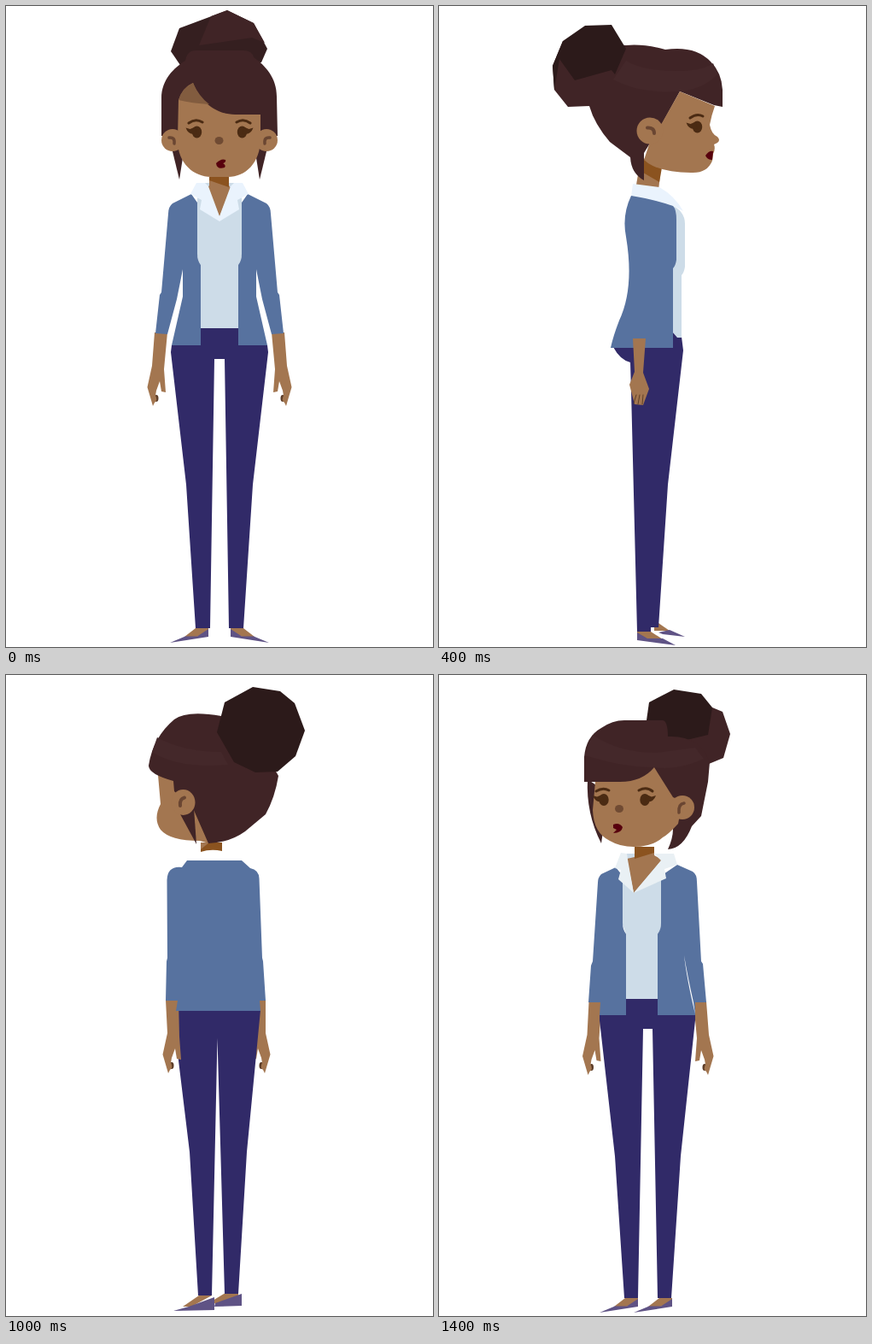
Animation, 500 px wide and 750 px high, one loop 1.6 s. Source, as an HTML page:

```html
<!DOCTYPE html>
<html lang="en">
<head>
<meta charset="utf-8">
<title>Turnaround</title>
<style>
html, body { margin: 0; width: 100%; height: 100%; overflow: hidden; background: #fff; }
svg { display: block; width: 100%; height: 100%; }
</style>
</head>
<body>
<svg id="stage" viewBox="0 0 500 750"></svg>
<script>
const STEP = 200;
const C = {
  skin: '#a37650', shade: '#8b531f', brow: '#825c3f', ear: '#6a4632', nose: '#704b33',
  hair: '#402426', band: '#44282a', bun: '#2c1a1a', bunMid: '#351f20', eye: '#4b2b13', lip: '#57000d',
  jacket: '#57729f', pants: '#312a68', shirt: '#cddce8', collar: '#eaf3fd', shoe: '#5f5385'
};

const fill = (color, d) => `<path fill="${color}" d="${d}Z"/>`;
const line = (color, w, d) => `<path fill="none" stroke="${color}" stroke-width="${w}" stroke-linecap="round" d="${d}"/>`;
const oval = (color, x, y, rx, ry = rx) => `<ellipse fill="${color}" cx="${x}" cy="${y}" rx="${rx}" ry="${ry}"/>`;
const move = (art, x, y = 0) => `<g transform="translate(${x} ${y})">${art}</g>`;
const flip = (art, width = 500, y = 0) => `<g transform="matrix(-1 0 0 1 ${width} ${y})">${art}</g>`;
const both = art => art + flip(art);

// Left forearm and hand; lean shifts the wrist end of the sleeve.
const hand = (lean = 0) =>
  oval('#5d3d28', 176, 459, 2.5, 4) +
  fill(C.skin, `M${174 + lean} 382H${189 + lean}L185 425 187 452 182 451 180 439 176 450 175 456Q178 461 174 464L172 468 165.500 446 171 421`);

const shoe = fill(C.skin, 'M209 738L222 728H237V732L224 738') +
  fill(C.shoe, 'M192 745L210 737.500H224L237 729V738');

// Eye with lashes pointing left.
const eye = (x, y) => oval(C.eye, x, y, 5.7, 7) +
  fill(C.eye, `M${x - 13} ${y - 5}L${x - 8} ${y - 3.5} ${x - 2} ${y - 6} ${x} ${y + 2}Q${x - 10} ${y + 4} ${x - 13} ${y - 5}`);

function front() {
  return both(fill(C.hair, 'M193 162L203 203 209 165')) +
    fill(C.bunMid, 'M203 26L259 5 290 20 306 50 299 66 206 72 193 53') +
    fill(C.hair, 'M240 12L259 5 290 20 303 43 288 37 226 46') +
    fill(C.hair, 'M182 152V108C182 86 197 72 210 64Q212 52 222 52H278Q288 52 290 60C304 70 317 84 317 106L318 152') +
    both(oval(C.skin, 195, 157, 13) + line(C.ear, 3.5, 'M191 154Q198 153 197 161')) +
    fill(C.skin, 'M219 90C226 110 245 127 268 127H298V155C298 184 280 200 260 200H240C220 200 200 184 201 155L202 110Q207 95 219 90') +
    fill(C.brow, 'M219 90Q226 106 238 115Q218 114 202 110Q206 96 219 90') +
    line(C.eye, 3, 'M214 137Q222 131 230 136M270 136Q278 131 286 137') +
    eye(223.500, 147.500) + flip(eye(223.500, 147.500)) +
    oval(C.nose, 249.500, 157.500, 5, 4.500) +
    fill(C.lip, 'M246 184Q252 178 257 180Q258 183 254 184Q258 186 256 189Q247 192 246 184') +
    both(hand()) + both(shoe) +
    fill(C.pants, 'M194 397L193 405 211 560 222 728H239L244 413H256L261 728H278L289 560 307 405 306 397 272 390V377H228V390') +
    fill(C.shirt, 'M224 225V292Q225 300 228 303V377H272V303Q275 300 276 292V225L268 207H232') +
    both(fill(C.jacket, 'M217 220L195 231Q190 235 190 243L182 335 180 338 175 383 189 384 200 343 207 308V340L194 397H228V303Q224 298 224 290V230')) +
    fill(C.skin, 'M238 200H261V210L263 213 250 247 236 213 238 210') +
    fill(C.shade, 'M238 200H261V212L238 204') +
    both(fill(C.collar, 'M223 207H233L237 211 250 246V252L227 238 229 227 216 220'));
}

function threeQuarter() {
  const collar = '#e9f0f4';
  return fill(C.hair, 'M268 72L320 38 332 43 341 69 333 97 316 104') +
    fill(C.bun, 'M243 53L246 32 275 17 307 22 320 38 315 70 290 76 267 72') +
    fill(C.hair, 'M174 122Q172 162 190 197L192 183 200 140') +
    fill(C.hair, 'M170 125V96Q172 72 190 62Q203 53 217 53H262Q268 54 268 72Q305 70 317 102L315 125 307 165 296 177Q286 203 268 204Q274 191 274 180L240 125') +
    fill(C.skin, 'M183 125H212Q238 125 252 108L274 143 285 148 280 174Q268 187 262 190Q250 201 228 201Q212 201 200 194Q181 185 180 158') +
    fill(C.band, 'M180 70Q210 91 255 91L300 85 310 98Q280 112 252 108Q215 108 171 94') +
    oval(C.skin, 285, 155, 14) + line(C.ear, 3.500, 'M281 161Q280 151 287 150') +
    line(C.eye, 3, 'M184 136Q192 131 199 135M234 135Q243 130 250 136') +
    eye(193, 146) + flip(eye(241, 146), 482) +
    oval(C.nose, 211, 156.500, 5, 4.500) +
    fill(C.lip, 'M204 175Q211 172 215 178Q214 185 204 185L208 181 204 179') +
    move(hand(-1), 2.500) + move(flip(hand()), -13) +
    move(shoe, -4, 1) + move(shoe, 36, 1) +
    fill(C.pants, 'M188 397V404L206 563 217 729H233L239 414H250L256 729H272L283 563 300 404V397L256 390V379H219V390') +
    fill(C.shirt, 'M215 235V292L219 303V379H256V303Q260 298 260 290V235L252 209H220') +
    fill(C.jacket, 'M207 225L190 233Q186 237 186 243L180 335 178 340 175 383H189L188 398H219V303Q215 298 215 290V235') +
    fill(C.jacket, 'M279 222L297 230Q302 233 302 242L307 335 309 338 313 383H300V398H256V303Q260 298 260 290V235') +
    fill('#fff', 'M287 328Q290 355 300 397L298 383Q291 352 287 328') +
    fill(C.skin, 'M229 201H252V211L261 216 228 255 220 215 229 213') +
    fill(C.shade, 'M229 201H252V208L229 215') +
    fill(collar, 'M213 208L220 209 221 216 228 255 210 239 213 228 206 226') +
    fill(collar, 'M252 209H275L279 222 264 227 266 238 228 255 260 217');
}

function side() {
  return fill(C.skin, 'M236 180L260 190 257 215 231 209') +
    fill(C.shade, 'M239 178L261 189 258 206 239 195') +
    fill(C.hair, 'M133 70L145 41 219 46Q240 44 265 51Q300 46 318 65Q331 78 332 98V118L322 116 282 100 261 138 240 172V204Q225 196 224 177L200 159Q182 138 176 117L151 118 135 98') +
    fill(C.band, 'M219 64Q240 77 285 76Q310 75 321 67L326 80Q310 97 282 100Q235 103 204 86') +
    fill(C.bun, 'M133 70L145 41 171 23 202 22 219 50 206 80 202 75 159 87 141 62 135 98') +
    fill(C.skin, 'M282 100L323 117Q319 128 317 139Q319 150 326 153Q330 157 326 160L322 162Q324 167 321 173L320 181Q314 196 295 195Q262 195 245 184L240 180 250 150 261 137') +
    oval(C.skin, 247, 146, 15.500) + line(C.ear, 4, 'M244 142.500Q252 142 252 149') +
    line(C.eye, 3, 'M294 131Q302 125 309 129') + eye(302.500, 141.500) +
    fill(C.lip, 'M312 175Q316 169 321 170L320 180Q314 180 312 175') +
    fill(C.skin, 'M257 722L270 731H252V727') + fill(C.shoe, 'M257 733L270 730 288 738 262 735') +
    fill(C.skin, 'M232 732H248L262 741H232') + fill(C.shoe, 'M232 733L244 740H262L277 748 232 742') +
    fill(C.pants, 'M204 399Q212 414 224 417L225 450 232 732H248V727H257L268 560 286 403 284 387 274 380') +
    fill(C.shirt, 'M270 232Q288 239 288 255V305Q287 312 284 315V388H279L273 381') +
    fill(C.collar, 'M227 208L258 212Q276 222 286 240L275 234 225 223') +
    fill(C.jacket, 'M225 222Q255 227 274 234Q278 238 278 250V297Q277 304 274 307V400H201Q204 386 211 368Q229 330 219 270Q214 245 225 222') +
    fill(C.skin, 'M227 389H242L239 429 246 448 239 467 229 466 223 443 229 428') +
    line('#5f3f26', 1, 'M231 455L228 465M235 455L233 466M239 455L238 466');
}

const rearBun = fill(C.bun, 'M152 67L164 35 181 21 213 16 246 34 255 69 235 104 210 116 184 115 163 97');

function backQuarter() {
  return fill(C.shade, 'M249 198H274V209Q262 205 249 208') +
    fill(C.skin, 'M264 198H274V206') +
    fill(C.skin, 'M304 124L324 119 321 153Q330 170 321 183Q310 196 275 196L264 199 280 155') +
    fill(C.hair, 'M250 50Q290 43 305 54Q330 75 335 108Q335 118 306 126L305 138 283 158 265 199Q240 198 222 185L198 165Q187 145 183 120L200 90') +
    fill(C.band, 'M250 92Q295 92 325 75L331 92Q300 112 242 107') +
    fill(C.hair, 'M282 158L299 163 279 200') +
    oval(C.skin, 294.500, 151, 14, 15) + line(C.ear, 4, 'M293 145.500Q299 147 298 155') +
    rearBun +
    move(hand(-3), 27) +
    fill(C.skin, 'M230 725H245L260 734 257 738 230 731') + fill(C.shoe, 'M226 726L257 737 258 741 226 740') +
    fill(C.skin, 'M261 728H276L295 741H285') + fill(C.shoe, 'M258 730L288 741 306 746 258 745') +
    fill(C.pants, 'M204 394H304L305 405 304 420 287 560 277 728H261L254.500 427 246 726H230L220 560') +
    move(flip(hand(-5)), -16) +
    fill(C.jacket, 'M226 219H290L296 227Q313 225 313.500 242L313 333 314 337 315 383H301L303 395H204L205 383H198L201 337 202 333 205.500 240Q206 230 216 228');
}

function back() {
  const heel = fill(C.skin, 'M222 727H239V737H220') + fill(C.shoe, 'M221 731L239 734V748H214');
  return fill(C.shade, 'M238 196H262V209Q250 205 238 208') +
    both(oval(C.skin, 195, 157, 13)) +
    fill(C.hair, 'M182 110C183 72 212 50 250 50S317 72 318 110Q317 142 303 165L278 186Q265 199 250 199T222 186L197 165Q183 142 182 110') +
    fill(C.band, 'M186 82Q250 110 314 82L317 96Q250 122 183 96') +
    move(rearBun, 46, -13) +
    both(hand()) + both(heel) +
    fill(C.pants, 'M194 394H306L307 405 289 560 278 730H261L250 427 239 730H222L211 560 193 405') +
    fill(C.jacket, 'M218 219H282L305 231Q310 235 310 243L318 335 320 338 325 383 311 384 300 343 293 308V340L306 396H194L207 340V308L200 343 189 384 175 383 180 338 182 335 190 243Q190 235 195 231');
}

const poses = [
  front(),
  flip(threeQuarter(), 490, -2),
  side(),
  backQuarter(),
  back(),
  flip(backQuarter(), 502, -2),
  flip(side(), 502),
  threeQuarter()
];

const stage = document.getElementById('stage');
stage.innerHTML = poses.map(art => `<g display="none">${art}</g>`).join('');
const groups = [...stage.children];
const start = performance.now();
let shown = -1;

function draw(now) {
  const pose = Math.floor(Math.max(0, now - start) / STEP) % poses.length;
  if (pose !== shown) {
    groups.forEach((g, i) => g.setAttribute('display', i === pose ? 'inline' : 'none'));
    shown = pose;
  }
  requestAnimationFrame(draw);
}
draw(start);
</script>
</body>
</html>
```
